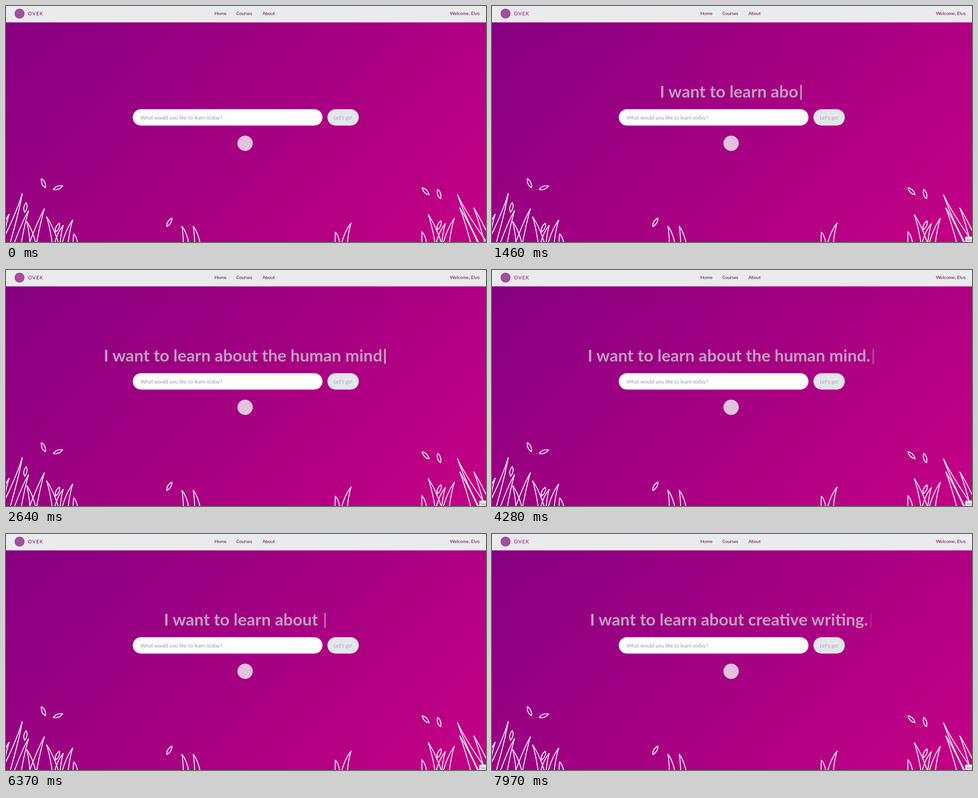
Animation of 1064 by 526 pixels, one loop 8000 ms. Source, as an HTML page:

```html
<!DOCTYPE html>
<html lang="en">
<head>
<meta charset="utf-8">
<title>Learning page</title>
<style>
  html, body { margin: 0; width: 100%; height: 100%; overflow: hidden; }
  body { position: relative; font-family: Lato, "Open Sans", sans-serif;
         background: linear-gradient(135deg, #860080, #c60085) 0 36px no-repeat; }
  svg { position: absolute; left: 0; top: 0; }
  h1 { position: absolute; left: 0; top: 165px; width: 1062px; margin: 0; text-align: center;
       font-size: 37px; font-weight: 700; line-height: 50px; color: #c49fbe; white-space: pre; }
  #cursor { display: inline-block; width: 4px; height: 33px; margin: 0 3.4px 0 4px;
            vertical-align: -5px; background: currentColor; }
</style>
</head>
<body>
<svg width="1064" height="526" viewBox="0 0 1064 526">
  <g id="grass" fill="none" stroke="#f5e8f3" stroke-width="2.1" stroke-linejoin="round"></g>

  <rect width="1064" height="36.5" fill="#e9ebec"/>
  <circle cx="30" cy="17" r="11" fill="#a64a9c"/>
  <text x="48.5" y="21" font-size="11" letter-spacing="1.2" fill="#8b0a7c">OVEK</text>
  <g font-size="10" fill="#45103f">
    <text x="462" y="20">Home</text>
    <text x="510.5" y="20">Courses</text>
    <text x="568.5" y="20">About</text>
    <text x="1050" y="20" font-size="10.2" text-anchor="end" fill="#640a50">Welcome, Elvo</text>
  </g>

  <rect x="281" y="230" width="420.5" height="36.5" rx="18.2" fill="#fff"/>
  <rect x="712.5" y="230" width="69.5" height="36.5" rx="18.2" fill="#e5e5ec"/>
  <g font-size="11.5">
    <text x="298" y="252.5" fill="#9298ad">What would you like to learn today?</text>
    <text x="747.3" y="252.5" text-anchor="middle" fill="#a9a6b8">Let's go!</text>
  </g>
  <circle cx="530" cy="306" r="17" fill="#e3c3df"/>

  <g id="tooltip">
    <rect x="1049" y="514" width="20" height="16" rx="2" fill="#f1f1f4"/>
    <text x="1051.5" y="523.5" font-size="7" fill="#777">Stop</text>
  </g>
</svg>
<h1><span id="typed"></span><span id="cursor"></span></h1>

<script>
const $ = id => document.getElementById(id);
const FLOOR = 528;

// A blade is known by its tip; taller ones have wider feet and fuller curves.
// side: 1 when the tip bends to the right of the foot, -1 to the left
function blade(x, y, side) {
  const h = FLOOR - y;
  const slant = side > 0 ? .33 : .1 + .004 * h;
  const foot = x - side * slant * h, half = 4 + .05 * h;
  const edge = base => [base + (x - base) * (.1 + .006 * h), y + h * .35];
  const left = foot - half, right = foot + half;
  return `M${left} ${FLOOR}Q${edge(left)} ${x} ${y}Q${edge(right)} ${right} ${FLOOR}`;
}

// A leaf is a pointed lens of fixed size, turned about its centre
function leaf(x, y, degrees) {
  const a = degrees * Math.PI / 180;
  const at = (along, across) => [
    x + along * Math.cos(a) - across * Math.sin(a),
    y + along * Math.sin(a) + across * Math.cos(a)];
  return `M${at(-11, 0)}Q${at(1, 7)} ${at(11, 0)}Q${at(-1, -7)} ${at(-11, 0)}Z`;
}

const bentRight = [[7, 464], [36, 418], [50, 456], [85, 452], [127, 489], [148, 477],
                   [765, 484], [974, 485], [994, 473]];
const bentLeft = [[46, 481], [90, 470], [150, 508], [390, 491], [415, 491], [730, 504],
                  [922, 503], [936, 465], [1006, 450], [1001, 421], [1037, 450]];
const drifting = [[83, 395, 65], [115, 405, -22], [43, 449, -80], [114, 494, -66],
                  [362, 482, -60], [930, 413, 45], [960, 419, 73], [960, 489, -66]];

$('grass').innerHTML = [
  ...bentRight.map(([x, y]) => blade(x, y, 1)),
  ...bentLeft.map(([x, y]) => blade(x, y, -1)),
  ...drifting.map(place => leaf(...place))
].map(d => `<path d="${d}"/>`).join('');

const STEM = 'I want to learn about ';
const FIRST = STEM + 'the human mind.';
const SECOND = 'creative writing.';
const KEY_MS = 69.5;

// Keystrokes made since a start time
const keys = (t, start) => Math.max(0, Math.floor((t - start) / KEY_MS) + 1);

function typedText(t) {
  if (t < 5390) return FIRST.slice(0, keys(t, 202));
  if (t < 6700) return FIRST.slice(0, Math.max(STEM.length, FIRST.length - keys(t, 5390)));
  return STEM + SECOND.slice(0, keys(t, 6710));
}

// The cursor fades in and out by turns, each time fast and then slowing
const easeOut = u => 1 - (1 - u) ** 2.3;
function cursorOpacity(t) {
  if (t < 160) return 0;
  const phase = (t - 160) / 1005 % 1 * 2;
  return phase < 1 ? easeOut(phase) : 1 - easeOut(phase - 1);
}

function draw() {
  const t = performance.now() % 8000;
  $('typed').textContent = typedText(t);
  $('cursor').style.opacity = cursorOpacity(t);
  $('tooltip').style.visibility = t < 1050 ? 'hidden' : 'visible';
  requestAnimationFrame(draw);
}
draw();
</script>
</body>
</html>
```
